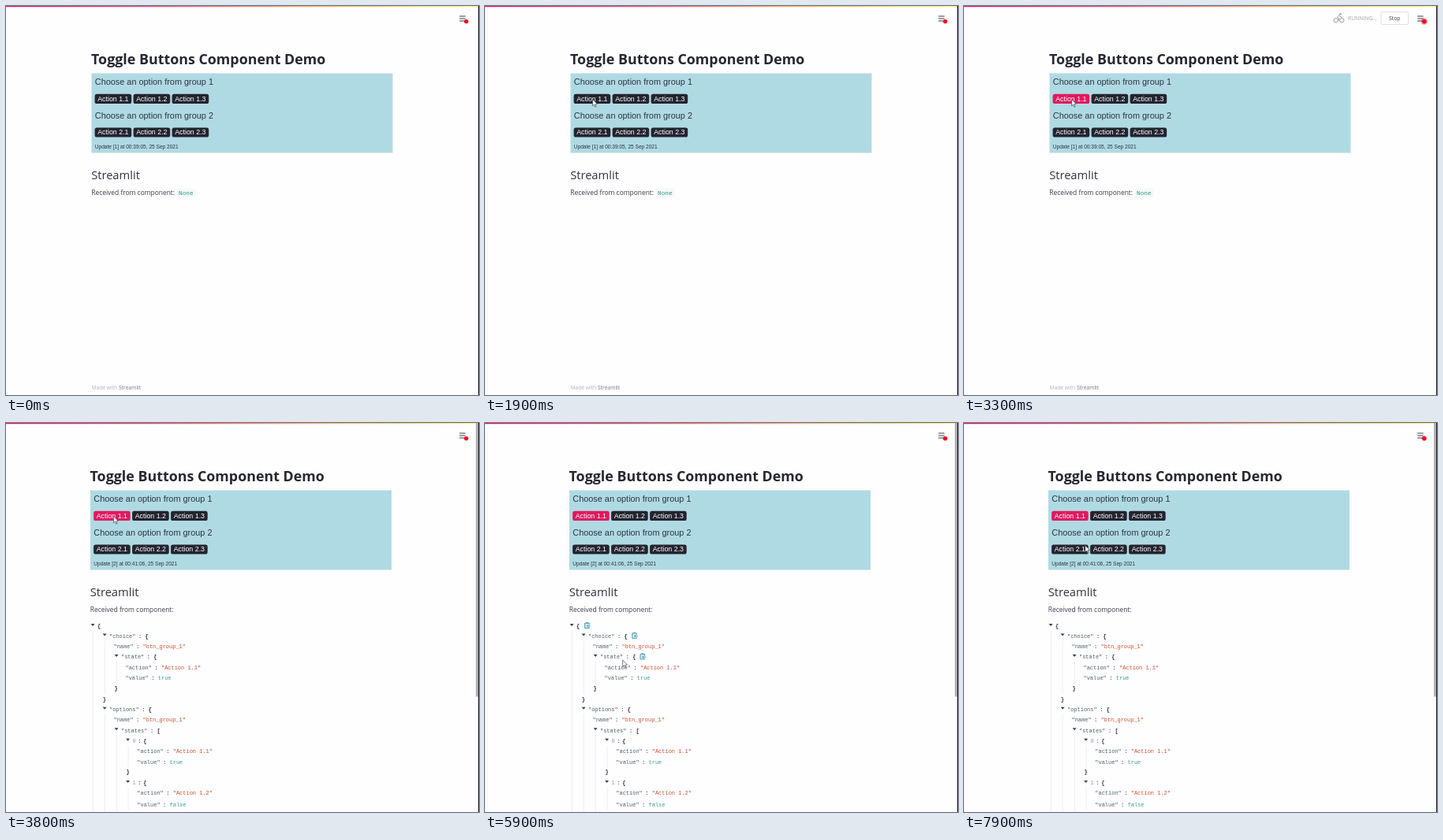
An HTML page for the animation above (8 s loop, 600 by 494 pixels).

```html
<!DOCTYPE html>
<html lang="en">
<head>
<meta charset="utf-8">
<title>Toggle Buttons Component Demo</title>
<style>
  html, body { margin: 0; width: 100%; height: 100%; overflow: hidden; background: #fefdff; }
  svg { display: block; width: 600px; height: 494px; }
  text { font-family: "Open Sans", "Noto Sans", sans-serif; white-space: pre; }
  .arial { font-family: "Liberation Sans", Arial, sans-serif; }
  .mono { font-family: "Liberation Mono", "DejaVu Sans Mono", monospace; }
  .bold { font-weight: 700; }
</style>
</head>
<body>
<svg id="stage" viewBox="0 0 600 494">
  <defs>
    <linearGradient id="bar">
      <stop offset="0" stop-color="#e8105c"/>
      <stop offset=".3" stop-color="#f5426a"/>
      <stop offset=".65" stop-color="#fbb36e"/>
      <stop offset="1" stop-color="#fff77c"/>
    </linearGradient>
    <radialGradient id="halo">
      <stop offset=".3" stop-color="#f00" stop-opacity=".8"/>
      <stop offset="1" stop-color="#f00" stop-opacity="0"/>
    </radialGradient>
    <g id="copy" stroke="#4a9bbd" stroke-width="1">
      <path d="M2.8-.6V-2.8H-2.8V3.5H2.8V2.4" fill="#d6e9f2"/>
      <path d="M-1.4-3.6H1.4M4.3 .8H0M1.4-.7L0 .8L1.4 2.3" fill="none"/>
    </g>
  </defs>
  <rect width="599" height="1.2" fill="url(#bar)"/>
  <g id="page"></g>
  <g id="json"></g>
  <rect id="thumb" x="596" width="3" height="347.5" fill="#b3b2b5"/>
  <rect x="599" width="1" height="494" fill="#1c1b1f"/>
  <g id="running">
    <g fill="none" stroke="#9b9ca2" stroke-width="1">
      <circle cx="471.7" cy="18.2" r="2.7"/>
      <circle cx="479.3" cy="18.2" r="2.7"/>
      <path d="M475.5 18.5V16L473.3 14.2L476 11.8L478 14H480.2"/>
    </g>
    <circle cx="477.4" cy="10.3" r="1.2" fill="#9b9ca2"/>
    <rect x="529" y="7.5" width="34.6" height="16" rx="2" fill="#fff" stroke="#d9d9de" stroke-width=".8"/>
  </g>
  <path d="M575.2 13H582.8M575.2 16H582.8M575.2 19H582.8" stroke="#3a3b46" stroke-width="1.2"/>
  <circle id="glow" cx="583.8" cy="19.6" fill="url(#halo)"/>
  <circle cx="583.8" cy="19.6" r="2.6" fill="#f5071c"/>
  <path id="pointer" d="M0 0V8.3L1.9 6.7L3.3 9.8L4.6 9.3L3.2 6.2L5.8 5.9Z" fill="#fff" stroke="#44444c" stroke-width=".7"/>
</svg>
<script>
const LOOP = 8000, PRESS = 3000, RUN = 3100, RERUN = 3600;
const $ = id => document.getElementById(id);

function add(parent, tag, attrs, content = '') {
  const el = document.createElementNS('http://www.w3.org/2000/svg', tag);
  for (const k in attrs) el.setAttribute(k, attrs[k]);
  el.textContent = content;
  return parent.appendChild(el);
}
const text = (parent, x, y, size, str, fill, cls = '') =>
  add(parent, 'text', { x, y, 'font-size': size, fill, class: cls }, str);

// Page and component
const page = $('page'), ink = '#262730';
text(page, 108, 73.8, 17.85, 'Toggle Buttons Component Demo', ink, 'bold');
add(page, 'rect', { x: 108.5, y: 85.5, width: 382, height: 101, fill: '#b0dae3' });
const buttons = [];
[1, 2].forEach(group => {
  const y = 111.8 + (group - 1) * 42.6;
  text(page, 112.8, y - 11.9, 10.9, 'Choose an option from group ' + group, '#2b3440', 'arial');
  [1, 2, 3].forEach(n => {
    const x = 112.6 + (n - 1) * 49;
    buttons.push(add(page, 'rect', { x, y, width: 46.6, height: 12.2, rx: 2.6 }));
    text(page, x + 3.6, y + 9, 8.85, `Action ${group}.${n}`, '#fff', 'arial');
  });
});
buttons.forEach(b => b.setAttribute('fill', '#23242f'));
const update = text(page, 112.8, 180.6, 6.57, '', '#2b3440', 'arial');
text(page, 108.2, 220.3, 14.7, 'Streamlit', '#31333f');
text(page, 108.3, 240.3, 8.43, 'Received from component:', '#3d3f49');
const none = add(page, 'g', {});
add(none, 'rect', { x: 216.8, y: 231.8, width: 24, height: 11.4, rx: 2, fill: '#f6f9f8' });
text(none, 219, 240.4, 7.8, 'None', '#2f9c88', 'mono');

const footer = text($('stage'), 108.4, 486.6, 6.72, 'Made with ', '#b4b5ba');
add(footer, 'tspan', { fill: '#7d7f88' }, 'Streamlit');
text($('running'), 487, 18.3, 6.8, 'RUNNING...', '#a3a4ab');
text($('running'), 539, 17.9, 6.8, 'Stop', '#3a3b46');

// JSON tree: baseline, x, key, value
const json = $('json'), SIZE = 6.97, CHAR = SIZE * .6;
const rows = [
  [260.2, 116, '', '{'],
  [272.8, 131, '"choice"', '{'],
  [285.8, 136.5, '"name"', '"btn_group_1"'],
  [299.3, 146, '"state"', '{'],
  [312.5, 151.5, '"action"', '"Action 1.1"'],
  [326.4, 151.5, '"value"', 'true'],
  [339.4, 137.5, '', '}'],
  [352.6, 122.7, '', '}'],
  [366, 131, '"options"', '{'],
  [379, 136.5, '"name"', '"btn_group_1"'],
  [392.6, 146, '"states"', '['],
  [406, 160.5, '0', '{'],
  [418.5, 166.3, '"action"', '"Action 1.1"'],
  [432.6, 166.3, '"value"', 'true'],
  [445.4, 152.5, '', '}'],
  [459.4, 160.5, '1', '{'],
  [472.2, 166.3, '"action"', '"Action 1.2"'],
  [486.6, 166.3, '"value"', 'false'],
  [499, 152.5, '', '}']
];
const guides = [[110.5, 264, 494], [125.3, 276, 345], [125.3, 369, 494], [140.3, 302, 332],
  [140.3, 396, 494], [155.2, 410, 438], [155.2, 463, 491]];
guides.forEach(([x, a, b]) => add(json, 'path', { d: `M${x} ${a}V${b}`, stroke: '#ecebef', 'stroke-width': .8 }));
rows.forEach(([y, x, key, value]) => {
  const index = /^\d/.test(key), end = x + key.length * CHAR;
  const bracket = '{}['.includes(value);
  if (key) {
    text(json, x, y, SIZE, key, index ? '#9a94c9' : '#4c646b', 'mono');
    text(json, end + (index ? 2.5 : 3.5), y, SIZE, ':', ink, 'mono');
  }
  const color = bracket ? '#22343c' : value[0] === '"' ? '#c8512b' : '#3a9d9b';
  text(json, key ? end + (index ? 9.5 : 12) : x, y, SIZE, value, color, bracket ? 'mono bold' : 'mono');
  if (value === '{' || value === '[') {
    add(json, 'path', { d: `M${x - 8.4} ${y - 5.3}h5l-2.5 3z`, fill: '#33454c' });
  }
});
const icon = (x, y) => add(json, 'use', { href: '#copy', x, y });
const icons = { root: icon(129.4, 257), choice: icon(189.6, 269.8), state: icon(199.8, 296.4), action: icon(253.6, 309.4) };

// Pointer stops: time, x, y
const stops = [[300, 52, 2], [950, 136.5, 118.5], [3900, 136.5, 118.5], [4450, 165, 205], [5000, 203, 307],
  [5600, 203, 307], [6300, 131, 292], [6600, 125.5, 289.8], [6900, 42, 232], [7250, 84, 190],
  [7700, 150, 158], [7900, 153.8, 155.5], [8000, 153.8, 155.5]];
function pointerAt(t) {
  const i = Math.max(1, stops.findIndex(s => s[0] > t));
  const [t0, x0, y0] = stops[i - 1], [t1, x1, y1] = stops[i];
  const u = Math.max(0, (t - t0) / (t1 - t0)), e = u * u * (3 - 2 * u);
  return [x0 + (x1 - x0) * e, y0 + (y1 - y0) * e];
}

const show = (el, on) => el.setAttribute('visibility', on ? 'inherit' : 'hidden');

function draw(t) {
  const done = t >= RERUN;
  page.setAttribute('transform', `translate(${done ? -1.5 : 0})`);
  buttons[0].setAttribute('fill', t >= PRESS ? '#e0195f' : '#23242f');
  update.textContent = `Update ${done ? '[2] at 00:41:06' : '[1] at 00:39:05'}, 25 Sep 2021`;
  show(none, !done);
  show(footer, !done);
  show(json, done);
  show($('thumb'), done);
  show($('running'), t >= RUN && !done);

  const [x, y] = pointerAt(t);
  $('pointer').setAttribute('transform', `translate(${x} ${y})`);
  show($('pointer'), t >= stops[0][0]);

  const inTree = done && x > 107 && y > 251;
  const onAction = inTree && x > 140 && y > 303 && y < 317;
  show(icons.root, inTree);
  show(icons.choice, inTree && x > 122 && y > 264 && y < 355);
  show(icons.action, onAction);
  show(icons.state, inTree && !onAction && y > 289 && y < 342);

  const pulse = Math.sin(Math.PI * (t % 1900) / 1900) ** 2;
  $('glow').setAttribute('r', 3.2 + 3.4 * pulse);
}

const start = performance.now();
(function frame() {
  const t = (performance.now() - start) % LOOP;
  draw(Math.floor(t / 100) * 100);
  requestAnimationFrame(frame);
})();
</script>
</body>
</html>
```
